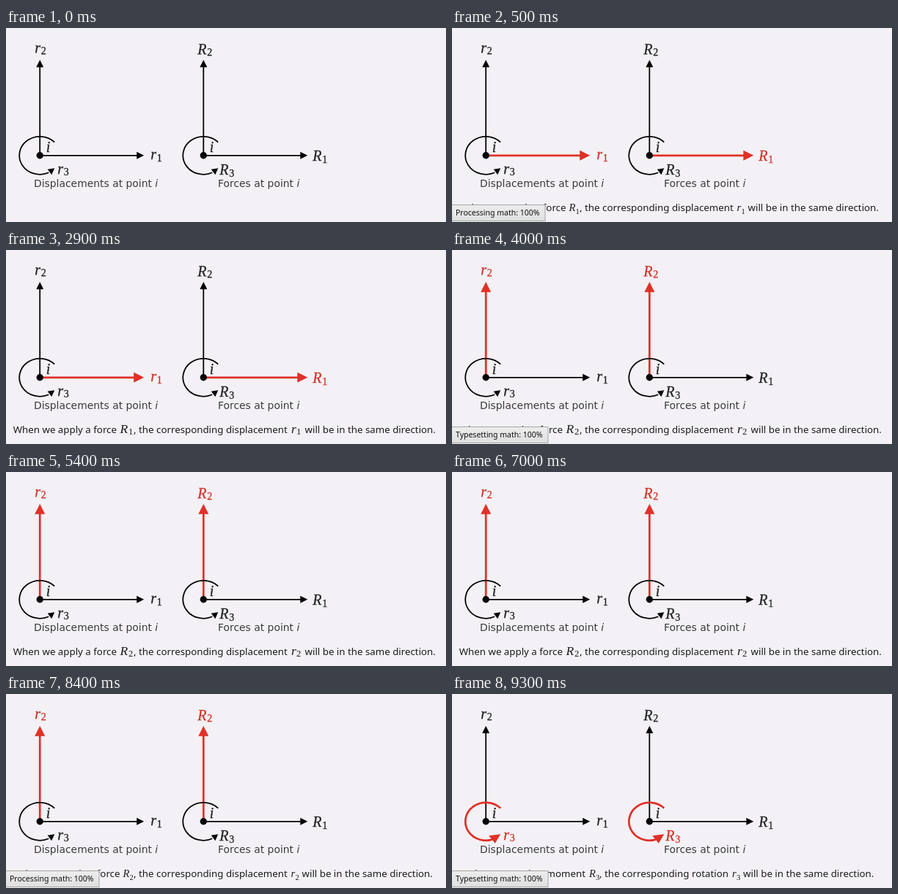
These frames come from a looping animation (600 px wide and 266 px high, 9400 ms). An HTML page:

```html
<!DOCTYPE html>
<html lang="en">
<head>
<meta charset="utf-8">
<title>Displacements and forces</title>
<style>
  html, body { margin: 0; width: 100%; height: 100%; overflow: hidden; background: #f3f1f5; }
  svg { display: block; width: 600px; height: 266px; }
  .math, .caption tspan { font-family: "Liberation Serif", serif; }
  .math { font-size: 20px; font-style: italic; fill: #242426; stroke: #242426; stroke-width: .3; }
  .sub { font-size: 14px; font-style: normal; }
  .label { font: 13.9px "DejaVu Sans", sans-serif; fill: #3a3a3c; }
  .caption { font: 13.3px "Noto Sans", sans-serif; fill: #1b1b1d; }
  .tip { font: 10.5px "Noto Sans", sans-serif; fill: #111; }
  .axis { stroke: currentColor; fill: none; stroke-width: 1.8; }
  .axis .head { fill: currentColor; stroke: none; }
  .part { color: #050505; }
  .part.on { color: #e03128; }
  .part.on .axis { stroke-width: 2.7; }
  .part.on .math { fill: #cf342c; stroke: #cf342c; }
  .part .big, .part.on .small { display: none; }
  .part.on .big { display: inline; }
</style>
</head>
<body>
<svg viewBox="0 0 600 266">
  <defs>
    <linearGradient id="tipFill" x2="0" y2="1">
      <stop stop-color="#ededed"/><stop offset="1" stop-color="#dfdfdf"/>
    </linearGradient>
  </defs>
  <g id="diagrams"></g>
  <g id="caption"></g>
  <g id="tip">
    <rect id="tipBox" x="-2" y="242.5" height="22" fill="url(#tipFill)" stroke="#a5a5a5"/>
    <text id="tipText" class="tip" x="5" y="257"></text>
  </g>
</svg>
<script>
const LOOP = 9400;
const $ = id => document.getElementById(id);

const symbol = (letter, n, x, y, gap) =>
  `<text class="math" x="${x}" y="${y}">${letter}</text>` +
  `<text class="math sub" x="${x + gap}" y="${y + 2.5}">${n}</text>`;

const part = (n, shaft, small, big, label) =>
  `<g class="part" data-step="${n}"><g class="axis"><path d="${shaft}"/>
    <path class="head small" d="${small}"/><path class="head big" d="${big}"/></g>${label}</g>`;

// Coordinates are relative to point i.
function diagram(x, letter, gap, spots, title, titleX) {
  const label = n => symbol(letter, n, ...spots[n - 1], gap);
  return `<g transform="translate(${x} 174.8)">` +
    part(1, 'M0 0H134', 'M142 0l-10-5v10z', 'M142 0l-14-7v14z', label(1)) +
    part(2, 'M0 0V-124', 'M0-131l-5 10h10z', 'M0-131l-7 14h14z', label(2)) +
    part(3, 'M20-18.2A28 26 0 1 0 12 23.5', 'M20 17.5l-9.5 1.5 5.5 7.5z',
      'M20 17.5l-16 2 8.5 10.5z', label(3)) +
    `<circle r="4.7" fill="#050505"/><text class="math" x="8.5" y="-5.3">i</text></g>
    <text class="label" x="${titleX}" y="218">${title} at point <tspan font-style="italic">i</tspan></text>`;
}

$('diagrams').innerHTML =
  diagram(46.2, 'r', 8.5, [[151, 5.5], [-7, -141], [24, 25]], 'Displacements', 38) +
  diagram(269.3, 'R', 13, [[149, 7.5], [-8, -139], [22, 26.5]], 'Forces', 289);

const inlineMath = (letter, n, x, done, gap) =>
  `<text class="caption"><tspan x="${x}" y="251" font-style="italic" font-size="${done ? 17.5 : 14.5}">${letter}</tspan>` +
  `<tspan x="${x + gap}" y="${done ? 253 : 254.5}" font-size="${done ? 12.5 : 10.5}">${n}</tspan></text>`;

function caption(step, done) {
  if (!step) return '';
  const turn = step === 3;
  const [end, force, comma, move, tail] =
    turn ? [182, 187, 201, 382, 397] : done ? [151, 155.5, 174, 389, 407.5] : [155.5, 159.5, 174, 388.5, 403.5];
  const words = (x, text, anchor = 'start') =>
    `<text class="caption" x="${x}" y="251" text-anchor="${anchor}">${text}</text>`;
  return words(end, 'When we apply a ' + (turn ? 'moment' : 'force'), 'end') +
    inlineMath('R', step, force, done, done ? 11.5 : 9) +
    words(comma, ', the corresponding ' + (turn ? 'rotation' : 'displacement')) +
    inlineMath('r', step, move, done, done ? 7 : 6) +
    words(tail, 'will be in the same direction.');
}

const TIPS = { Processing: 129, Typesetting: 133 };

// start, step, formulas set, message, message fade length
const TIMELINE = [
  [0, 0, false, ''],
  [200, 1, false, 'Processing'],
  [600, 1, true, 'Typesetting'],
  [900, 1, true, 'Typesetting', 400],
  [1300, 1, true, ''],
  [3100, 2, false, 'Processing'],
  [3600, 2, true, 'Typesetting'],
  [4100, 2, true, ''],
  [7100, 1, false, 'Processing'],
  [7400, 1, true, 'Typesetting'],
  [7900, 1, true, 'Typesetting', 400],
  [8300, 2, false, 'Processing'],
  [8600, 2, true, 'Typesetting'],
  [8900, 3, false, 'Processing'],
  [9200, 3, false, 'Typesetting']
];

let shown = null;
const began = performance.now();

function show(state) {
  const [, step, done, message] = state;
  document.querySelectorAll('.part').forEach(p => p.classList.toggle('on', +p.dataset.step === step));
  $('caption').innerHTML = caption(step, done);
  $('tipText').textContent = message && message + ' math: 100%';
  $('tipBox').setAttribute('width', TIPS[message] || 0);
  shown = state;
}

function draw(now) {
  const t = Math.max(0, now - began) % LOOP;
  const state = TIMELINE.findLast(s => s[0] <= t);
  if (state !== shown) show(state);
  const [start, , , message, fade] = state;
  $('tip').setAttribute('opacity', message ? (fade ? 1 - (t - start) / fade : 1) : 0);
  requestAnimationFrame(draw);
}
draw(began);
</script>
</body>
</html>
```
